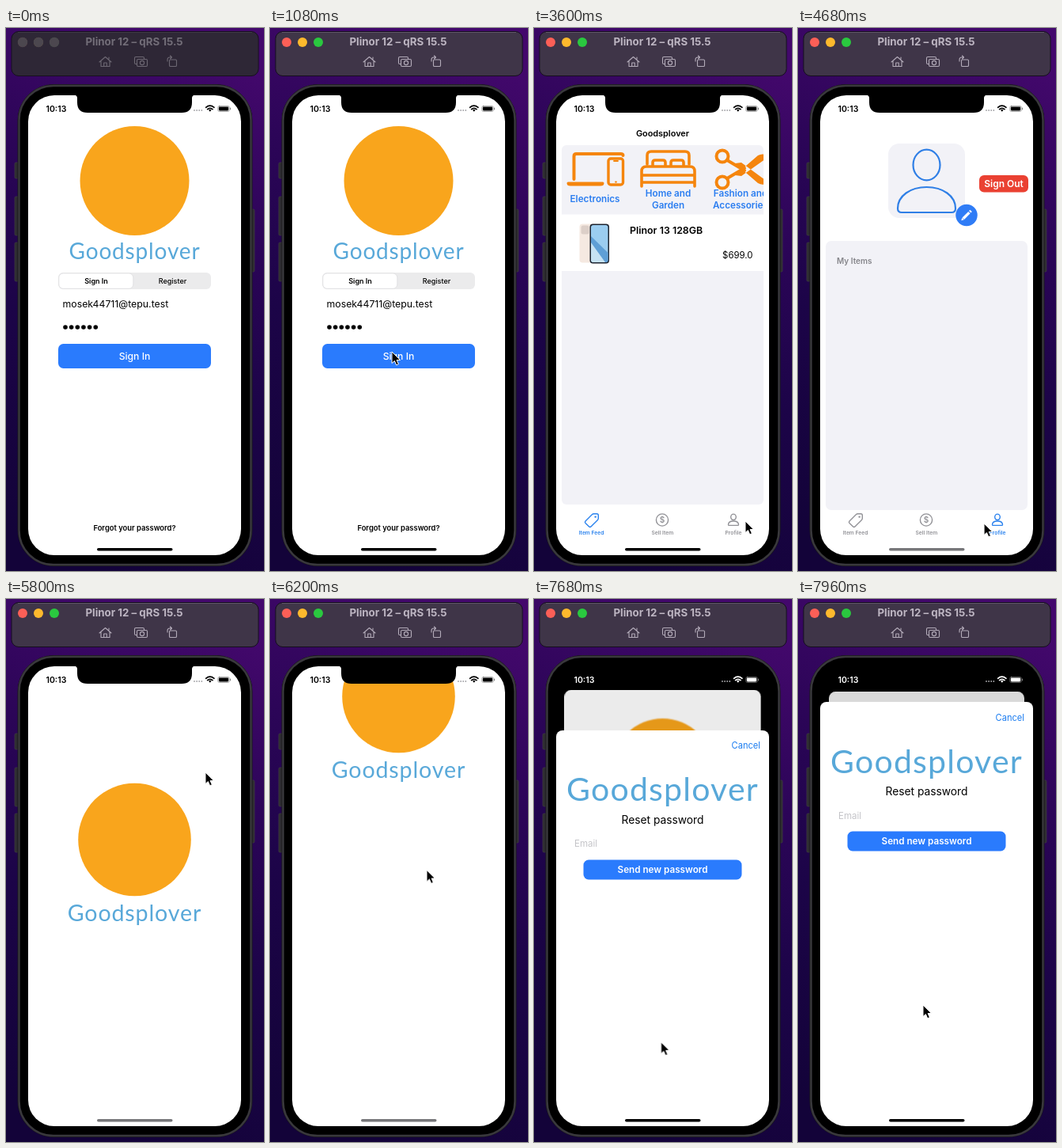
An HTML page that plays this animation: 326 px wide and 686 px high, repeating every 8000 ms.

```html
<!DOCTYPE html>
<html lang="en">
<head>
<meta charset="utf-8">
<title>Shop app demo</title>
<style>
html, body { margin: 0; width: 100%; height: 100%; overflow: hidden; background: #1a0448; }
svg { display: block; width: 100%; height: 100%; font-family: Inter, "Open Sans", sans-serif; }
.mid { text-anchor: middle; }
.semi { font-weight: 600; }
.bold { font-weight: 700; }
.word { font-family: Lato, sans-serif; fill: #58a8d9; text-anchor: middle; letter-spacing: .03em; }
.line { fill: none; stroke: currentColor; stroke-linecap: round; stroke-linejoin: round; }
.blue { fill: #2a7bfd; }
.hint { fill: #c4c4c8; }
.pane { fill: #f2f2f7; }

/* One loop is 8 s, so 1% = 80 ms */
.a { animation: 8s linear infinite; }
.cut { animation: 8s step-end infinite; }

#idle { animation-name: idle; }
@keyframes idle { 0%, 9% { opacity: 1 } 11%, 100% { opacity: 0 } }

#login { animation-name: login; }
@keyframes login {
  0%, 30.49% { opacity: 1 } 30.5%, 87.5% { opacity: 0 } 90.9%, 100% { opacity: 1 }
}
#filled { animation-name: filled; }
@keyframes filled { 0% { opacity: 1 } 20.5%, 100% { opacity: 0 } }
#hints { animation-name: hints; }
@keyframes hints { 0% { opacity: 0 } 20.5%, 100% { opacity: 1 } }

#dim { animation-name: dim; }
@keyframes dim { 0%, 20.5% { opacity: 0 } 23%, 28% { opacity: .2 } 30.5%, 100% { opacity: 0 } }
#alert { animation-name: alert; transform-origin: 162.5px 380px; }
@keyframes alert {
  0%, 20.5% { opacity: 0; transform: scale(1.15); animation-timing-function: ease-out }
  23%, 28% { opacity: 1; transform: none }
  30.5%, 100% { opacity: 0; transform: none }
}

#feed { animation-name: feed; }
@keyframes feed { 0% { opacity: 0 } 30.5% { opacity: 1 } 50.5%, 100% { opacity: 0 } }
#sell { animation-name: sell; }
@keyframes sell { 0% { opacity: 0 } 50.5% { opacity: 1 } 58.25%, 100% { opacity: 0 } }
#profile { animation-name: profile; }
@keyframes profile { 0% { opacity: 0 } 58.25% { opacity: 1 } 70.5%, 100% { opacity: 0 } }
#tabs { animation-name: tabs; }
@keyframes tabs { 0% { opacity: 0 } 30.5% { opacity: 1 } 70.5%, 100% { opacity: 0 } }
#tab1 { animation-name: tab1; }
#tab2 { animation-name: tab2; }
#tab3 { animation-name: tab3; }
@keyframes tab1 { 0% { color: #2a82ee } 50.5%, 100% { color: #929297 } }
@keyframes tab2 { 0% { color: #929297 } 50.5% { color: #2a82ee } 58.25%, 100% { color: #929297 } }
@keyframes tab3 { 0% { color: #929297 } 58.25%, 100% { color: #2a82ee } }

#splash { animation-name: splash; }
@keyframes splash {
  0%, 70.49% { opacity: 0; transform: translateY(180px) }
  70.5%, 73% { opacity: 1; transform: translateY(180px); animation-timing-function: ease-in }
  77.5% { opacity: 1; transform: none }
  80% { opacity: 1; transform: translateY(-190px) }
  80.1%, 100% { opacity: 0; transform: translateY(-190px) }
}

#card { animation-name: card; transform-origin: 162.5px 85px; }
@keyframes card {
  0%, 93% { transform: none; animation-timing-function: cubic-bezier(.25, .8, .3, 1) }
  98.75%, 100% { transform: translateY(32px) scale(.918) }
}
#shade { animation-name: shade; }
@keyframes shade { 0%, 93% { opacity: 0 } 98.75%, 100% { opacity: .15 } }
#sheet { animation-name: sheet; }
@keyframes sheet {
  0%, 93% { transform: translateY(560px); animation-timing-function: cubic-bezier(.25, .8, .3, 1) }
  98.75%, 100% { transform: none }
}
#status { animation-name: status; }
@keyframes status { 0%, 93% { color: #000 } 95%, 100% { color: #fff } }
#bar { animation-name: bar; }
@keyframes bar { 0% { fill: #000 } 50.5% { fill: #77777a } 87.5%, 100% { fill: #000 } }

#cursor { animation-name: cursor; }
@keyframes cursor {
  0% { transform: translate(197px, 692px); animation-timing-function: ease-out }
  6%, 13% { transform: translate(151px, 408px) }
  13.5%, 17.5% { transform: translate(154px, 409px) }
  25%, 28% { transform: translate(157px, 399px); animation-timing-function: ease-in-out }
  33%, 35% { transform: translate(238px, 190px) }
  38% { transform: translate(284px, 160px); animation-timing-function: ease-in-out }
  45%, 47% { transform: translate(267px, 623px); animation-timing-function: ease-in-out }
  50%, 54% { transform: translate(165px, 622px); animation-timing-function: ease-in }
  58.5% { transform: translate(235px, 626px) }
  59.5% { transform: translate(243px, 626px); animation-timing-function: ease-in-out }
  67%, 70% { transform: translate(262px, 196px); animation-timing-function: ease-in }
  77.5% { transform: translate(198px, 342px); animation-timing-function: ease-out }
  90% { transform: translate(162px, 612px) }
  92%, 93.5% { transform: translate(164px, 628px); animation-timing-function: ease-out }
  99.5%, 100% { transform: translate(158px, 513px) }
}
</style>
</head>
<body>
<svg viewBox="0 0 326 686">
  <defs>
    <linearGradient id="wall" x1=".6" y1="0" x2=".4" y2="1">
      <stop offset="0" stop-color="#43086c"/>
      <stop offset=".3" stop-color="#2c0558"/>
      <stop offset=".6" stop-color="#1c0448"/>
      <stop offset="1" stop-color="#130339"/>
    </linearGradient>
    <linearGradient id="frost" x1="0" y1="0" x2="0" y2="1">
      <stop offset="0" stop-color="#ececed"/>
      <stop offset=".55" stop-color="#eff0f2"/>
      <stop offset="1" stop-color="#d9e7f6"/>
    </linearGradient>
    <clipPath id="screen"><rect x="28" y="85" width="269" height="581" rx="33"/></clipPath>
    <clipPath id="shelf"><rect x="35" y="148" width="255" height="88" rx="6"/></clipPath>
  </defs>

  <rect width="326" height="686" fill="url(#wall)"/>

  <!-- Simulator toolbar -->
  <rect x="7" y="4.5" width="312" height="56" rx="9" fill="#3f3548" stroke="#15101c"/>
  <path d="M15 5.5H311" stroke="#6a6072" stroke-width=".8"/>
  <circle cx="21" cy="18" r="6" fill="#fc5f57"/>
  <circle cx="41" cy="18" r="6" fill="#fdb92d"/>
  <circle cx="61" cy="18" r="6" fill="#2ac83f"/>
  <text class="mid bold" x="162" y="22" font-size="13.3" fill="#bdb5c2">Plinor 12 – qRS 15.5</text>
  <g class="line" color="#b3abb9" stroke-width="1.1">
    <path d="M118 43l7.5-6.5 7.500 6.500M120 41.500v7h11v-7M123.700 48.500v-4.500h3.600v4.500M130 39v-2"/>
    <path d="M165.500 45.500h-1.500q-1.500 0-1.500-1.500v-6q0-1.500 1.500-1.500h9q1.500 0 1.500 1.500v.5"/>
    <rect x="165.500" y="39.500" width="13" height="9" rx="1.500"/>
    <circle cx="172" cy="44" r="2.600"/>
    <rect x="206.500" y="40" width="9" height="8.500" rx="1.300"/>
    <path d="M204 42v-2q0-3 3-3h2M207.500 35l2 2-2 2"/>
  </g>
  <g id="idle" class="a">
    <rect x="7" y="4.500" width="312" height="56" rx="9" fill="#1c1921" opacity=".46"/>
    <g fill="#4c474f">
      <circle cx="21" cy="18" r="6.200"/><circle cx="41" cy="18" r="6.200"/><circle cx="61" cy="18" r="6.200"/>
    </g>
  </g>

  <!-- Phone body -->
  <g fill="#2e2d31" stroke="#434246" stroke-width=".6">
    <rect x="11" y="170" width="6" height="20" rx="1.500"/>
    <rect x="11" y="213" width="6" height="49" rx="1.500"/>
    <rect x="11" y="271" width="6" height="49" rx="1.500"/>
    <rect x="308" y="229" width="6" height="79" rx="1.500"/>
  </g>
  <rect x="15" y="71.500" width="296" height="608" rx="45" fill="#000" stroke="#18181a"/>
  <rect x="16.500" y="73" width="293" height="605" rx="43.500" fill="#000" stroke="#39383c" stroke-width="2.500"/>

  <g clip-path="url(#screen)">
    <g id="card" class="a">
      <rect x="28" y="85" width="269" height="582" rx="9" fill="#fff"/>
      <g id="login" class="a">
        <circle cx="162.500" cy="193" r="69" fill="#f9a51c"/>
        <text class="word" x="162.500" y="292" font-size="28">Goodsplover</text>
        <rect x="66" y="309" width="193" height="21" rx="6" fill="#ebebec"/>
        <rect x="66.800" y="309.900" width="94" height="19.400" rx="5.500" fill="#fff" stroke="#d9d9db" stroke-width=".7"/>
        <text class="mid semi" x="114" y="323" font-size="9">Sign In</text>
        <text class="mid" x="210.500" y="323" font-size="9" font-weight="500">Register</text>
        <g id="filled" class="cut">
          <text x="71.500" y="352.500" font-size="12.300">mosek44711@tepu.test</text>
          <path d="M75 378h38.500" stroke="#000" stroke-width="5.600" stroke-linecap="round" stroke-dasharray="0 7.650"/>
        </g>
        <g id="hints" class="cut hint" font-size="11.900">
          <text x="71" y="352.500">Email</text>
          <text x="71" y="381.500">Password</text>
        </g>
        <rect class="blue" x="66" y="399" width="193" height="31" rx="6.500"/>
        <text class="mid" x="162.500" y="419" font-size="12.200" font-weight="500" fill="#fff">Sign In</text>
        <text class="mid semi" x="162.500" y="635" font-size="9.400">Forgot your password?</text>
      </g>
      <rect id="shade" class="a" x="28" y="85" width="269" height="582" rx="9"/>
    </g>

    <rect id="dim" class="a" x="28" y="85" width="269" height="581"/>
    <g id="alert" class="a">
      <rect x="69" y="344" width="187" height="72" rx="9" fill="url(#frost)" opacity=".96"/>
      <path d="M69 385.500H256" stroke="#c5cbd3" stroke-width=".7"/>
      <text class="mid semi" x="162.500" y="369" font-size="11.100">Logged in</text>
      <text class="mid semi" x="163.500" y="405" font-size="11.300" fill="#1580f5">Ok</text>
    </g>

    <g id="feed" class="cut">
      <text class="mid semi" x="162.500" y="137" font-size="10.900">Goodsplover</text>
      <rect class="pane" x="35" y="148" width="255" height="454" rx="6"/>
      <rect x="35" y="235.500" width="255" height="71.500" fill="#fff"/>
      <g clip-path="url(#shelf)">
        <g class="line" color="#f5850d" stroke-width="4">
          <path d="M50.500 191v-29q0-3 3-3h56q3 0 3 2"/>
          <path d="M43 196h44q0 2-3 2h-38q-3 0-3-2z" stroke-width="3"/>
          <rect x="94" y="165" width="18.500" height="33" rx="3" stroke-width="3.400"/>
          <path d="M101 168h5M103 194.500h1" stroke-width="1.800"/>
          <path d="M143 172v-11q0-5 5-5h43q5 0 5 5v11M150 174v-4q0-3 3-3h10q3 0 3 3v4M173 174v-4q0-3 3-3h10q3 0 3 3v4" stroke-width="3.600"/>
          <path d="M136 200v-19q0-6 6-6h55q6 0 6 6v19M136 186h67M136 195h67" stroke-width="3.600"/>
          <circle cx="238" cy="162" r="7.500"/>
          <circle cx="238" cy="195" r="7.500"/>
          <path d="M244 167l22 13M244 190l22-13"/>
        </g>
        <path fill="#f5850d" d="M254 171l8-1 34 25q-6 5-13 1zM254 186l8 1 34-24q-6-6-13-2z"/>
        <g class="mid semi" font-size="11.700" fill="#2a7df0">
          <text x="77" y="220">Electronics</text>
          <text x="169.500" y="213">Home and</text>
          <text x="169.500" y="227.500">Garden</text>
          <text x="261" y="213">Fashion and</text>
          <text x="261" y="227.500">Accessories</text>
        </g>
      </g>
      <rect x="57.500" y="247.500" width="24" height="49" rx="4" fill="#f5e9e1"/>
      <rect x="59.500" y="249.500" width="10" height="11" rx="2.500" fill="#dccfc8"/>
      <rect x="70.500" y="247.500" width="24.500" height="50" rx="4" fill="#1d2430"/>
      <rect x="72" y="249" width="21.500" height="47" rx="3" fill="#9bcdf0"/>
      <path d="M72 263l21.500 21v9q0 3-3 3h-5L72 281z" fill="#5f9fd6"/>
      <path d="M72 271l18 25H75q-3 0-3-3z" fill="#c6e2f3"/>
      <text class="semi" x="121" y="260" font-size="12.400">Plinor 13 128GB</text>
      <text x="276.500" y="290.500" font-size="11.400" text-anchor="end">$699.0</text>
    </g>

    <g id="sell" class="cut">
      <text class="mid semi" x="162.500" y="137" font-size="10.900">Sell Item</text>
    </g>

    <g id="profile" class="cut">
      <rect class="pane" x="114" y="146" width="97" height="94" rx="14"/>
      <g class="line" color="#2f7fe6" stroke-width="2.200">
        <ellipse cx="162.500" cy="173" rx="17" ry="19.300"/>
        <path d="M126 228c0-16 16-27 36.500-27s36.500 11 36.500 27q0 5-5 5h-63q-5 0-5-5z"/>
      </g>
      <circle cx="213" cy="236.500" r="13.700" fill="#2f7cf6"/>
      <path d="M208.800 240.700l7.600-7.600" stroke="#fff" stroke-width="3.400"/>
      <path d="M217.200 232.300l1.400-1.400" stroke="#fff" stroke-width="3.400"/>
      <path d="M206.300 243.200l1-3.400 2.400 2.400z" fill="#fff"/>
      <rect x="229" y="186" width="62" height="21.500" rx="6" fill="#ea4132"/>
      <text class="mid semi" x="260" y="201.200" font-size="12" fill="#fff">Sign Out</text>
      <rect class="pane" x="35" y="269" width="255" height="340" rx="7"/>
      <text class="semi" x="49" y="297.500" font-size="10" fill="#85858a">My Items</text>
    </g>

    <g id="tabs" class="cut">
      <g id="tab1" class="cut">
        <path class="line" stroke-width="1.400" d="M65 623l8.500-8.500q.8-.8 2-.8h4q1.800 0 1.800 1.800v4q0 1.200-.8 2l-8.300 8.300q-1.400 1.400-2.800 0l-4.400-4.200q-1.200-1.200 0-2.600z"/>
        <circle cx="77.600" cy="617.600" r="1.200" fill="currentColor"/>
        <text class="mid semi" x="72.500" y="640" font-size="6.700" fill="currentColor">Item Feed</text>
      </g>
      <g id="tab2" class="cut">
        <circle class="line" cx="162" cy="621.500" r="7.600" stroke-width="1.400"/>
        <text class="mid semi" x="162" y="625.200" font-size="10" fill="currentColor">$</text>
        <text class="mid semi" x="162.300" y="640" font-size="6.700" fill="currentColor">Sell Item</text>
      </g>
      <g id="tab3" class="cut">
        <g class="line" stroke-width="1.400">
          <ellipse cx="252" cy="617.800" rx="3.300" ry="3.700"/>
          <path d="M245.500 627.500c0-3 3-4.500 6.500-4.500s6.500 1.500 6.500 4.500q0 .9-1 .9h-11q-1 0-1-.9z"/>
        </g>
        <text class="mid semi" x="252" y="640" font-size="6.700" fill="currentColor">Profile</text>
      </g>
    </g>

    <g id="splash" class="a">
      <circle cx="162.500" cy="124" r="71.300" fill="#f9a51c"/>
      <text class="word" x="162.500" y="227" font-size="28.600">Goodsplover</text>
    </g>

    <g id="sheet" class="a">
      <rect x="28" y="130" width="269" height="560" rx="8" fill="#fff"/>
      <text x="286" y="153.500" font-size="11.100" text-anchor="end" fill="#1a7cf0">Cancel</text>
      <text class="word" x="162.500" y="219.500" font-size="41">Goodsplover</text>
      <text class="mid" x="162.500" y="248" font-size="13.800">Reset password</text>
      <text class="hint" x="51" y="277.500" font-size="11.500">Email</text>
      <rect class="blue" x="62.500" y="293.500" width="200" height="25" rx="6.500"/>
      <text class="mid semi" x="162.500" y="310.300" font-size="11.700" fill="#fff">Send new password</text>
    </g>

    <g id="status" class="a">
      <text class="semi" x="50.500" y="106" font-size="10.500" fill="currentColor">10:13</text>
      <path d="M238 104h11" stroke="#a5a5a8" stroke-width="1.900" stroke-linecap="round" stroke-dasharray="0 3.100"/>
      <g class="line" stroke-width="1.700" stroke-linecap="butt">
        <path d="M252.600 100.300q5-4.400 10.400 0M254.600 102.600q3.200-2.600 6.400 0"/>
      </g>
      <path d="M255.900 103.600q1.900-1.300 3.800 0l-1.900 2.200z" fill="currentColor"/>
      <rect class="line" x="267.700" y="98.500" width="14.600" height="7" rx="2" stroke-width=".7" opacity=".45"/>
      <rect x="268.800" y="99.600" width="12.400" height="4.800" rx="1.100" fill="currentColor"/>
      <path d="M283.600 100.700v2.600" stroke="currentColor" stroke-width="1" opacity=".5"/>
    </g>
    <rect id="bar" class="cut" x="115" y="657" width="95.500" height="3.600" rx="1.800"/>
  </g>

  <path d="M86 84.500q4 .5 4 4v5.500q0 13 13 13h119q13 0 13-13v-5.500q0-3.500 4-4z"/>

  <path id="cursor" class="a" d="M0 0v14.500l3.400-3 2.300 5.300 2.700-1.200-2.300-5.100h4.500z" stroke="#fff" stroke-width="1" stroke-linejoin="round"/>
</svg>
</body>
</html>
```
